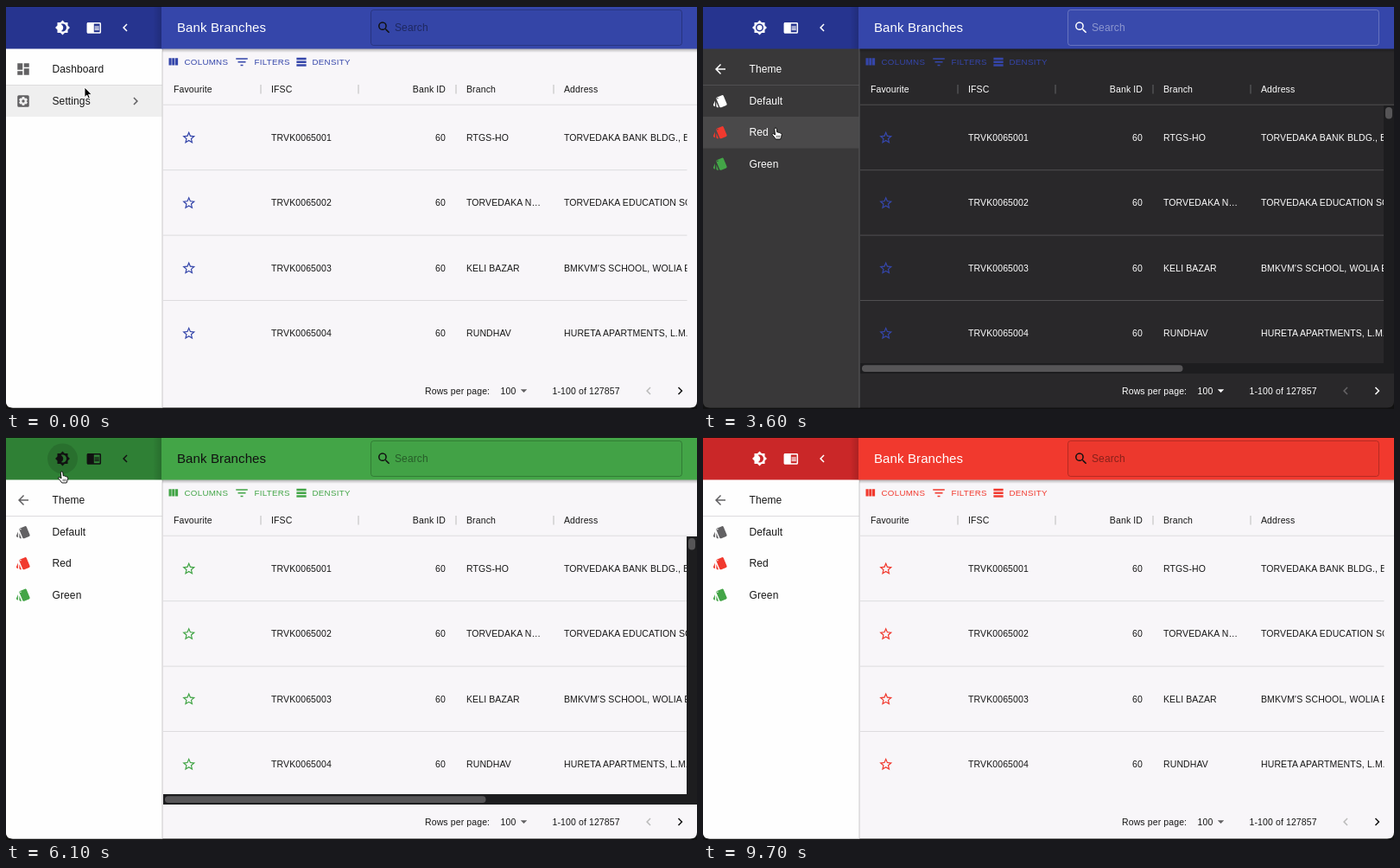
An HTML page for the animation above (9.75 s loop, 800 by 466 pixels).

```html
<!DOCTYPE html>
<html lang="en">
<head>
<meta charset="utf-8">
<title>Bank Branches</title>
<style>
html, body { margin: 0; width: 100%; height: 100%; overflow: hidden; background: #111; }
svg { display: block; width: 800px; height: 466px; font-family: "Liberation Sans", Arial, sans-serif; }
.item { font-size: 12px; letter-spacing: .00938em; }
.cell { font-size: 10.5px; letter-spacing: .01071em; }
.tool { font-size: 9.75px; letter-spacing: .02857em; }
.title { font-size: 15px; letter-spacing: .0075em; }
</style>
</head>
<body>
<svg viewBox="0 0 800 466">
  <defs>
    <clipPath id="win"><path d="M0 1H800V457Q800 464.5 792 464.5H8Q0 464.5 0 457Z"/></clipPath>
    <clipPath id="grid"><rect x="182" y="77" width="606.5" height="348"/></clipPath>
    <linearGradient id="drop" x2="0" y2="1">
      <stop stop-opacity=".3"/><stop offset="1" stop-opacity="0"/>
    </linearGradient>
    <linearGradient id="side" x1="1" x2="0">
      <stop stop-opacity=".16"/><stop offset="1" stop-opacity="0"/>
    </linearGradient>
  </defs>
  <g clip-path="url(#win)"><g id="back"></g><g id="hover"></g><g id="front"></g></g>
  <g id="cursor"></g>
</svg>
<script>
const LOOP = 9750;
const $ = id => document.getElementById(id);

const THEMES = {
  blue:  { bar: '#3546aa', head: '#26348f', on: '#fff' },
  red:   { bar: '#f1392e', head: '#ca2728', on: '#fff' },
  green: { bar: '#43a547', head: '#2f8035', on: '#111' }
};
const LIGHT = { page: '#f8f6f9', drawer: '#fefefe', text: '#161616', icon: '#626163', line: '#dddcde',
  edge: '#c9c8ca', faint: '#bbb', field: '#000', search: '#111' };
const DARK = { page: '#29282a', drawer: '#393839', text: '#fff', icon: '#fff', line: '#504f51',
  edge: '#5b5a5c', faint: '#656466', field: '#fff', search: '#fff' };

const MENUS = {
  main: [['dashboard', 'Dashboard'], ['settings', 'Settings', true]],
  settings: [['back', 'Settings'], ['style', 'Theme', true], ['rtl', 'RTL mode']],
  theme: [['back', 'Theme'], ['style', 'Default'], ['style', 'Red', false, '#f1392e'], ['style', 'Green', false, '#43a547']]
};
const ROW_Y = [73, 110, 146, 182.5];
const ROW_EDGES = [55, 91.5, 128, 164.5, 201];

const BRANCHES = [
  ['RTGS-HO', 'TORVEDAKA BANK BLDG., BLOCK'],
  ['TORVEDAKA N…', 'TORVEDAKA EDUCATION SOCIETY'],
  ['KELI BAZAR', "BMKVM'S SCHOOL, WOLIA ESTATE"],
  ['RUNDHAV', 'HURETA APARTMENTS, L.M. ROAD']
];

// Six-toothed cog cut out of a rounded square
function cogSquare() {
  const points = [];
  for (let tooth = 0; tooth < 6; tooth++) {
    [[-.5, 5], [-.24, 6.9], [.24, 6.9], [.5, 5]].forEach(([offset, r]) => {
      const a = tooth * Math.PI / 3 + offset - Math.PI / 2;
      points.push((12 + r * Math.cos(a)).toFixed(2) + ' ' + (12 + r * Math.sin(a)).toFixed(2));
    });
  }
  return `M5 3h14a2 2 0 0 1 2 2v14a2 2 0 0 1-2 2H5a2 2 0 0 1-2-2V5a2 2 0 0 1 2-2z
    M${points.join('L')}zM12 9.8a2.2 2.2 0 1 0 0 4.4a2.2 2.2 0 1 0 0-4.4z`;
}

const SUN = 'M20 8.69V4h-4.69L12 .69 8.69 4H4v4.69L.69 12 4 15.31V20h4.69L12 23.31 15.31 20H20v-4.69L23.31 12z';
const ICONS = {
  dashboard: 'M3 13h8V3H3zm0 8h8v-6H3zm10 0h8V11h-8zm0-18v6h8V3z',
  settings: cogSquare(),
  back: 'M20 11H7.83l5.59-5.59L12 4l-8 8 8 8 1.41-1.41L7.83 13H20z',
  style: 'M2.53 19.65l1.34.56v-9.03l-2.43 5.86c-.41 1.02.08 2.19 1.09 2.61zm19.5-3.7L17.07 3.98c-.31-.75-1.04-1.21-1.81-1.23-.26 0-.53.04-.79.15L7.1 5.95c-.75.31-1.21 1.03-1.23 1.8-.01.27.04.54.15.8l4.96 11.97c.31.76 1.05 1.22 1.83 1.23.26 0 .52-.05.77-.15l7.36-3.05c1.02-.42 1.51-1.59 1.09-2.6zM7.88 8.75a1 1 0 1 1 0-2 1 1 0 1 1 0 2zm-2 11c0 1.1.9 2 2 2h1.45l-3.45-8.34z',
  rtl: 'M10 10v5h2V4h2v11h2V4h2V2h-8a4 4 0 0 0 0 8zm-2 7v-3l-4 4 4 4v-3h12v-2z',
  moon: SUN + 'M12 18c-.89 0-1.74-.2-2.5-.55C11.56 16.5 13 14.42 13 12s-1.44-4.5-3.5-5.45C10.26 6.2 11.11 6 12 6a6 6 0 0 1 0 12z',
  sun: SUN + 'M12 18a6 6 0 1 1 0-12 6 6 0 1 1 0 12zM12 8a4 4 0 1 0 0 8 4 4 0 1 0 0-8z',
  reader: 'M13 12h7v1.5h-7zm0-2.5h7V11h-7zm0 5h7V16h-7zM21 4H3c-1.1 0-2 .9-2 2v13c0 1.1.9 2 2 2h18c1.1 0 2-.9 2-2V6c0-1.1-.9-2-2-2zm0 15h-9V6h9z',
  left: 'M15.41 7.41L14 6l-6 6 6 6 1.41-1.41L10.83 12z',
  right: 'M10 6L8.59 7.41 13.17 12l-4.58 4.59L10 18l6-6z',
  search: 'M15.5 14h-.79l-.28-.27A6.5 6.5 0 1 0 13.73 14.43l.27.28v.79l5 4.99L20.49 19zm-6 0a4.5 4.5 0 1 1 0-9 4.5 4.5 0 1 1 0 9z',
  columns: 'M10 18h5V5h-5zm-6 0h5V5H4zM16 5v13h5V5z',
  filter: 'M10 18h4v-2h-4zM3 6v2h18V6zm3 7h12v-2H6z',
  density: 'M21 8H3V4h18zM21 10H3v4h18zM21 16H3v4h18z',
  star: 'M22 9.24l-7.19-.62L12 2 9.19 8.63 2 9.24l5.46 4.73L5.82 21 12 17.27 18.18 21l-1.63-7.03zM12 15.4l-3.76 2.27 1-4.28-3.32-2.88 4.38-.38L12 6.1l1.71 4.04 4.38.38-3.32 2.88 1 4.28z',
  drop: 'M7 10l5 5 5-5z'
};

const SIZE = { item: 12, cell: 10.5, tool: 9.75, title: 15 };
const icon = (name, x, y, fill, size = 18) =>
  `<path fill="${fill}" fill-rule="evenodd" transform="translate(${x - size / 2} ${y - size / 2}) scale(${size / 24})" d="${ICONS[name]}"/>`;
const text = (kind, x, y, label, fill, extra = '') =>
  `<text class="${kind}" x="${x}" y="${y + SIZE[kind] * .36}" fill="${fill}" ${extra}>${label}</text>`;
const rect = (x, y, w, h, fill, extra = '') =>
  `<rect x="${x}" y="${y}" width="${w}" height="${h}" fill="${fill}" ${extra}/>`;
const END = 'text-anchor="end"';

// [time, value] pairs; the last one reached holds
const at = (steps, t) => steps.filter(s => s[0] <= t).pop()[1];
const MODE = [[0, LIGHT], [850, DARK], [5850, LIGHT]];
const THEME = [[0, 'blue'], [3800, 'red'], [4600, 'green'], [6750, 'red']];
const MENU = [[0, 'main'], [2050, 'settings'], [2850, 'theme']];
const BARS = [[0, false], [900, true], [6200, false]];

function drawBack({ mode, theme }) {
  return rect(0, 0, 800, 466, mode.page) + rect(0, 49, 181, 417, mode.drawer) +
    rect(0, 1, 181, 48.5, theme.head) + rect(170, 1, 11, 48.5, 'url(#side)');
}

function drawMenu({ mode, menu }) {
  return MENUS[menu].map(([name, label, more, tint], i) =>
    icon(name, 20, ROW_Y[i], tint || mode.icon) + text('item', 53.5, ROW_Y[i], label, mode.text) +
    (more ? icon('right', 150, ROW_Y[i], mode.icon) : '')).join('') +
    rect(0, 91, 181, 1, mode.line);
}

function drawGrid({ mode, theme }) {
  const color = theme.bar;
  let out = icon('columns', 193.5, 64.7, color, 15) + text('tool', 206.5, 64.5, 'COLUMNS', color) +
    icon('filter', 273, 64.7, color, 18) + text('tool', 287.5, 64.5, 'FILTERS', color) +
    icon('density', 342, 64.7, color, 15) + text('tool', 354.5, 64.5, 'DENSITY', color);
  [[194, 'Favourite'], [307, 'IFSC'], [533, 'Branch'], [646, 'Address']]
    .forEach(([x, label]) => out += text('cell', x, 96.3, label, mode.text));
  out += text('cell', 509, 96.3, 'Bank ID', mode.text, END);
  for (let i = 0; i < 4; i++) out += rect(294.5 + i * 113, 91, 1, 10.5, mode.faint);
  out += rect(182, 113.7, 618, 1, mode.line) + '<g clip-path="url(#grid)">';
  BRANCHES.forEach(([branch, address], i) => {
    const y = 152 + i * 75.4;
    out += icon('star', 211.7, y + .3, color) +
      text('cell', 307, y, 'TRVK006500' + (i + 1), mode.text) +
      text('cell', 509, y, '60', mode.text, END) +
      text('cell', 533, y, branch, mode.text) + text('cell', 646, y, address, mode.text);
    if (i < 3) out += rect(182, y + 37.2, 607, 1, mode.line);
  });
  return out + '</g>';
}

function drawBars() {
  const track = '#1d1d1f', thumb = '#565557';
  return rect(788, 115, 12, 310, track) + rect(182, 413, 618, 12, track) +
    rect(790, 117, 8, 13.5, thumb, 'rx="4"') + rect(184, 415.3, 371.5, 7.7, thumb, 'rx="3.8"');
}

function drawFront(state) {
  const { mode, theme, bars } = state;
  const on = theme.on;
  return drawMenu(state) + drawGrid(state) + (bars ? drawBars() : '') +
    text('cell', 485, 445, 'Rows per page:', mode.text) + text('cell', 572.5, 445, '100', mode.text) +
    icon('drop', 599.5, 444.7, mode.icon) + text('cell', 632.5, 445, '1-100 of 127857', mode.text) +
    icon('left', 744, 445, mode.faint) + icon('right', 780.5, 445, mode.text) +
    rect(180.5, 49, 1, 417, mode.edge) +
    rect(181, 49, 619, 5, 'url(#drop)') + rect(180, 1, 620, 48.5, theme.bar) +
    icon(mode === DARK ? 'sun' : 'moon', 65.5, 25, on) + icon('reader', 101.8, 25, on) + icon('left', 138, 25, on) +
    text('title', 198, 24.5, 'Bank Branches', on) +
    rect(422.5, 4.5, 360, 41, mode.field, `rx="3" fill-opacity=".02" stroke="${mode.field}" stroke-opacity=".24"`) +
    icon('search', 437.8, 25, mode.search) +
    text('item', 450, 25, 'Search', mode.field, 'fill-opacity=".43"');
}

// Pointer tip: time, x, y
const PATH = [[0, 91, 94], [250, 91, 93], [650, 73, 23], [1300, 73, 23], [1800, 91, 108], [2150, 91, 108],
  [2500, 93, 104], [3250, 90, 106], [3600, 84, 141], [4100, 84, 144], [4300, 83, 178], [4900, 82, 179],
  [5600, 66, 24], [6000, 66, 25], [6100, 64.5, 40], [6550, 66, 141], [7200, 66, 141], [7600, 72, -30]];

function pointer(t) {
  if (t <= 0) return PATH[0].slice(1);
  const i = PATH.findIndex(p => p[0] > t);
  if (i < 0) return [72, -30];
  const [t0, x0, y0] = PATH[i - 1], [t1, x1, y1] = PATH[i];
  const k = (t - t0) / (t1 - t0), e = k * k * (3 - 2 * k);
  return [x0 + (x1 - x0) * e, y0 + (y1 - y0) * e];
}
const onToggle = (x, y) => Math.hypot(x - 65.5, y - 25) < 18;
const onRow = (y, i) => y >= ROW_EDGES[i] && y < ROW_EDGES[i + 1];

// Share of the last 150 ms spent inside, which gives a linear fade
function fade(t, inside) {
  let hits = 0;
  for (let k = 0; k < 15; k++) if (inside(...pointer(t - k * 10))) hits++;
  return hits / 15;
}

function drawHover(t, { mode, menu }) {
  let out = `<circle cx="65.5" cy="25" r="17.5" fill-opacity="${.13 * fade(t, onToggle)}"/>`;
  MENUS[menu].forEach(([name], i) => {
    const strength = name === 'back' ? 0 : fade(t, (x, y) => onRow(y, i));
    if (strength) out += rect(0, ROW_EDGES[i], 180.5, ROW_EDGES[i + 1] - ROW_EDGES[i], mode.field,
      `fill-opacity="${strength * (mode === DARK ? .085 : .06)}"`);
  });
  return out;
}

const ARROW = '<path d="M0 0V11.5L2.7 9.1 4.4 13 6.3 12.2 4.6 8.4H8.2Z" fill="#000" stroke="#fff" stroke-width=".9"/>';
const HAND = `<path d="M-1.2 1.2Q-1.2 0 0 0T1.3 1.2L1.8 5Q3.2 4.4 3.8 5.5 5 5 5.6 6.1 7.2 5.9 7.2 7.6L6.6 10.5 5.6 13H.2
  L-1.8 10.2-4 7.8Q-4 6.2-2.2 6.8L-.5 8Z" fill="#fff" stroke="#000" stroke-width=".9" stroke-linejoin="round"/>
  <path d="M1.6 8.6V11.2M3.2 8.6V11.2M4.8 8.6V11.2" stroke="#000" stroke-width=".6"/>`;

let shown = '';
function render(t) {
  const name = at(THEME, t);
  const state = { mode: at(MODE, t), theme: THEMES[name], menu: at(MENU, t), bars: at(BARS, t) };
  const key = [name, state.mode.page, state.menu, state.bars].join();
  if (key !== shown) {
    shown = key;
    $('back').innerHTML = drawBack(state);
    $('front').innerHTML = drawFront(state);
  }
  $('hover').innerHTML = drawHover(t, state);
  const [x, y] = pointer(t);
  const active = t > 400 && (onToggle(x, y) || MENUS[state.menu].some((_, i) => onRow(y, i)));
  $('cursor').innerHTML = active ? HAND : ARROW;
  $('cursor').setAttribute('transform', `translate(${x.toFixed(2)} ${y.toFixed(2)})`);
}

const start = performance.now();
function tick() {
  render((performance.now() - start) % LOOP);
  requestAnimationFrame(tick);
}
tick();
</script>
</body>
</html>
```
